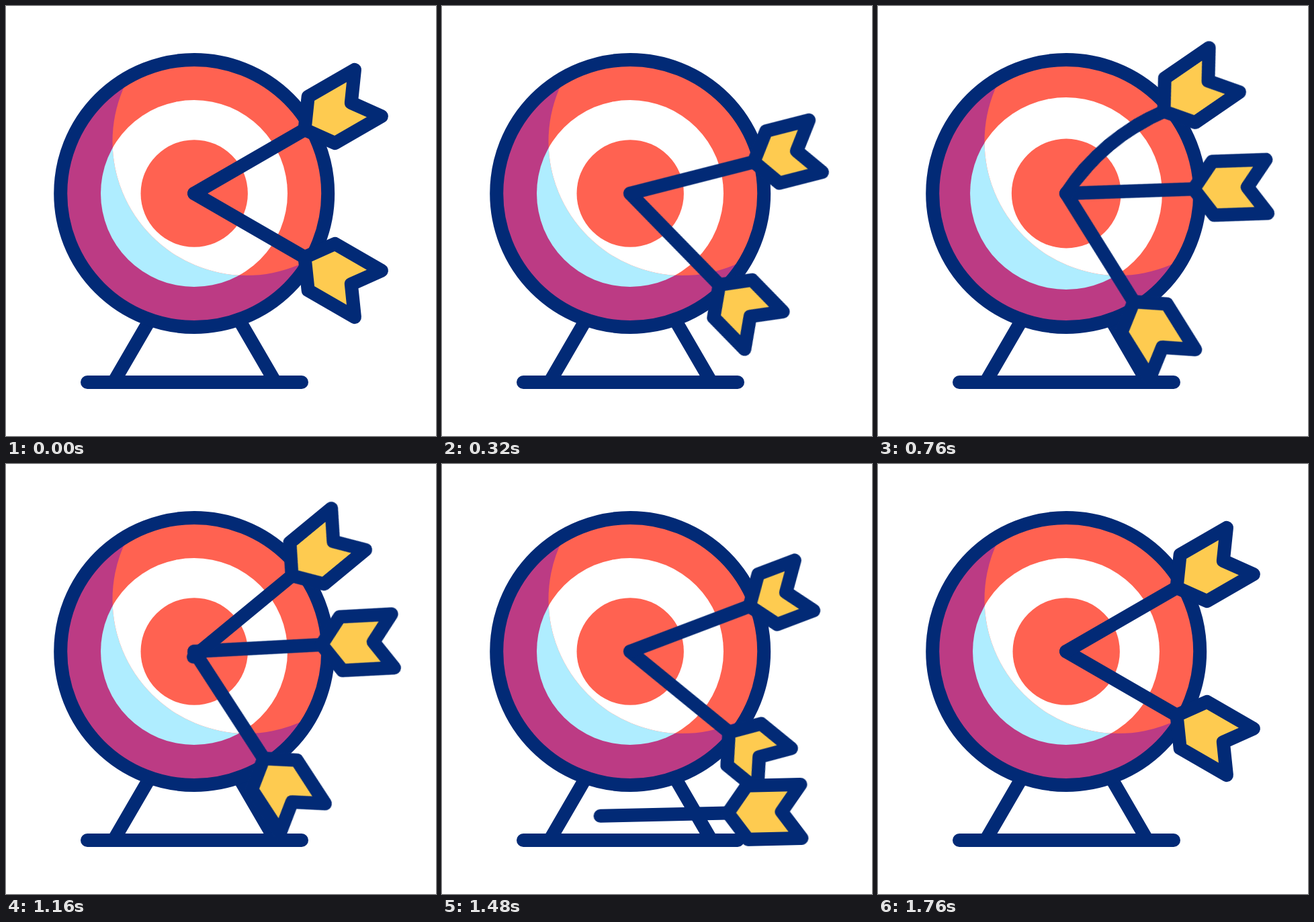
An HTML page for the animation above (2000 ms loop, 640 px wide and 640 px high).

```html
<!DOCTYPE html>
<html lang="en">
<head>
<meta charset="utf-8">
<title>Target and arrows</title>
<style>
  html, body { margin: 0; width: 100%; height: 100%; overflow: hidden; background: #fff; }
  svg { display: block; width: 100%; height: 100%; }

  .line, .shaft, .fletch { stroke: #022a76; stroke-width: 20; stroke-linecap: round; stroke-linejoin: round; fill: none; }
  .fletch { fill: #fecb50; }
  .leg { stroke-linecap: butt; }

  .spin, .stretch, .fly, .drop, .turn, .bow, .flex, .outer, .inner {
    animation: 2s cubic-bezier(.333, 0, .667, 1) infinite;
  }
  .spin { animation-name: spin; }
  .stretch { animation-name: stretch; }
  .fly { animation-name: fly; }
  .drop { animation-name: drop; }
  .turn { animation-name: turn; transform-origin: 190px 0; }
  .bow { animation-name: bow; }
  .flex { animation-name: flex; transform-origin: 190px 0; }
  .outer { animation-name: outer; }
  .inner { animation-name: inner; }

  /* stuck arrows swing round the bullseye and back */
  @keyframes spin {
    0%, 2% { transform: rotate(0deg); }
    28% { transform: rotate(28deg); }
    56% { transform: rotate(28deg); animation-timing-function: cubic-bezier(.144, 0, .667, 1); }
    88%, 100% { transform: rotate(0deg); }
  }
  /* feather tails shorten and overshoot while swinging */
  @keyframes stretch {
    0%, 2% { d: path("M190 0L219 -40L299 -40L270 0L299 40L219 40Z"); }
    10.5% { d: path("M190 0L219 -40L277 -40L248 0L277 40L219 40Z"); }
    27% { d: path("M190 0L219 -40L307 -40L278 0L307 40L219 40Z"); }
    34% { d: path("M190 0L219 -40L299 -40L270 0L299 40L219 40Z"); }
    56% { d: path("M190 0L219 -40L299 -40L270 0L299 40L219 40Z"); animation-timing-function: cubic-bezier(.144, 0, .667, 1); }
    71% { d: path("M190 0L219 -40L275 -40L246 0L275 40L219 40Z"); }
    88%, 100% { d: path("M190 0L219 -40L299 -40L270 0L299 40L219 40Z"); }
  }
  /* third arrow: flies in, quivers, drops out */
  @keyframes fly {
    0% { transform: translateX(480px); }
    16% { transform: translateX(480px); animation-timing-function: linear; }
    28.63%, 100% { transform: translateX(0); }
  }
  @keyframes bow {
    0%, 29% { d: path("M0 0Q95 0 190 0"); }
    34% { d: path("M0 0Q95 28 190 0"); }
    38% { d: path("M0 0Q95 -28 190 0"); }
    42% { d: path("M0 0Q95 12 190 0"); }
    46%, 100% { d: path("M0 0Q95 0 190 0"); }
  }
  @keyframes flex {
    0%, 29% { transform: rotate(0deg); }
    34% { transform: rotate(-5.5deg); }
    38% { transform: rotate(5.5deg); }
    42% { transform: rotate(-2.4deg); }
    46%, 100% { transform: rotate(0deg); }
  }
  @keyframes drop {
    0% { transform: translateY(0); }
    56% { transform: translateY(0); animation-timing-function: cubic-bezier(.333, .033, .667, .366); }
    80%, 100% { transform: translateY(621px); }
  }
  @keyframes turn {
    0% { transform: rotate(0deg); }
    56% { transform: rotate(0deg); animation-timing-function: cubic-bezier(.333, 0, .667, .333); }
    80%, 100% { transform: rotate(68.4deg); }
  }
  /* rings swell on impact */
  @keyframes outer {
    0%, 29% { r: 139px; }
    37.5% { r: 143px; }
    46%, 100% { r: 139px; }
  }
  @keyframes inner {
    0%, 29% { r: 79.7px; }
    37.5% { r: 81.4px; }
    46%, 100% { r: 79.7px; }
  }
</style>
</head>
<body>
<svg viewBox="0 0 640 640">
  <defs>
    <clipPath id="lit"><circle cx="358" cy="201.5" r="199.5"/></clipPath>
  </defs>

  <path class="line leg" d="M213 469L163 555M348 469L398 555"/>
  <path class="line" d="M121 560H440"/>

  <circle cx="280" cy="279" r="195" fill="#bc3b84"/>
  <circle class="outer" cx="280" cy="279" r="139" fill="#afedff"/>
  <g clip-path="url(#lit)">
    <circle cx="280" cy="279" r="195" fill="#ff6251"/>
    <circle class="outer" cx="280" cy="279" r="139" fill="#fff"/>
  </g>
  <circle class="inner" cx="280.2" cy="279" r="79.7" fill="#ff6251"/>
  <circle class="line" cx="280.2" cy="279" r="199"/>

  <g transform="translate(280 279)">
    <g class="spin">
      <g transform="rotate(30)">
        <path class="shaft" d="M0 0H190"/>
        <path class="fletch stretch" d="M190 0L219 -40L299 -40L270 0L299 40L219 40Z"/>
      </g>
      <g transform="rotate(-30)">
        <path class="shaft" d="M0 0H190"/>
        <path class="fletch stretch" d="M190 0L219 -40L299 -40L270 0L299 40L219 40Z"/>
      </g>
    </g>
    <g class="drop">
      <g transform="rotate(-40)">
        <g class="fly">
          <g class="turn">
            <path class="shaft bow" d="M0 0Q95 0 190 0"/>
            <path class="fletch flex" d="M190 0L219 -40L299 -40L270 0L299 40L219 40Z"/>
          </g>
        </g>
      </g>
    </g>
  </g>
</svg>
</body>
</html>
```
